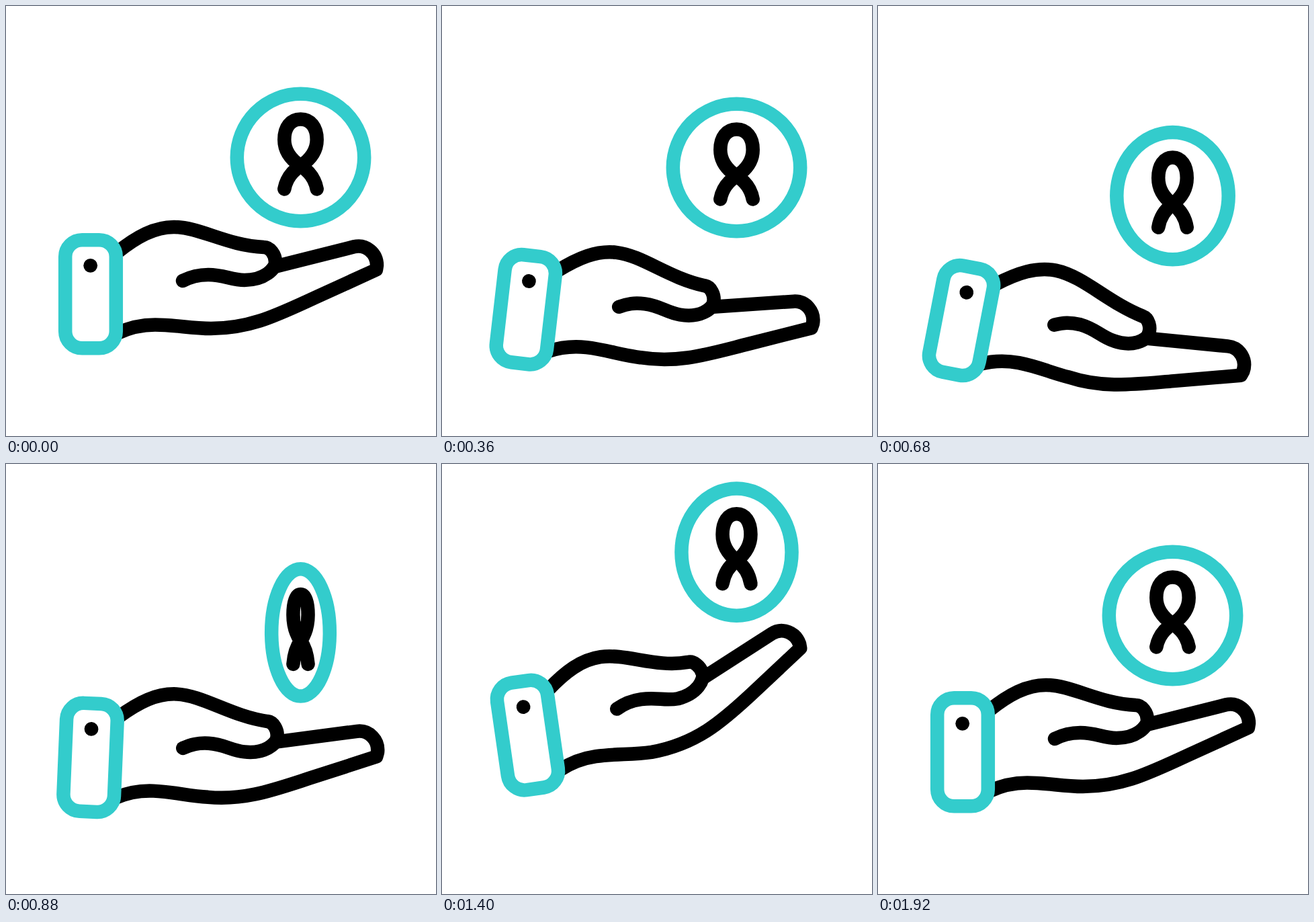
These frames come from a looping animation (640 by 640 pixels, 2160 ms). An HTML page:

```html
<!DOCTYPE html>
<html lang="en">
<head>
<meta charset="utf-8">
<title>Hand tossing a ribbon coin</title>
<style>
  html, body { margin: 0; width: 100%; height: 100%; overflow: hidden; background: #fff; }
  svg { display: block; width: 100vw; height: 100vh; }
  .line { fill: none; stroke: #000; stroke-width: 20.5; stroke-linejoin: round; }
  .round { stroke-linecap: round; }
  .teal { stroke: #33cccc; }
</style>
</head>
<body>
<svg viewBox="0 0 640 640">
  <path id="thumb" class="line"/>
  <path id="palm" class="line"/>
  <path id="crease" class="line round"/>
  <g id="cuff">
    <rect class="line teal" x="88.2" y="348.2" width="75.6" height="161.1" rx="25"/>
    <circle cx="125.7" cy="386.3" r="10.4"/>
  </g>
  <g id="coin">
    <path id="ribbon" class="line round"/>
    <ellipse id="ring" class="line teal" cx="438.5" cy="225.5" ry="94.7"/>
  </g>
</svg>
<script>
const LOOP = 2160, STEP = 40, LAST = 47;
const WRIST = { x: 126, y: 428.75 }, AXIS_Y = 404, COIN_X = 438.5;
const RAD = Math.PI / 180;

const shapes = {
  thumb: "M165 367 C195 343 221 329 250 329 C289 329 330 357 384 359 C393 359 401 370 401 381",
  crease: "M401 381 C401 391 385 408 355 408 C335 408 325 400 301 400 C285 400 275 403 263 409",
  palm: "M402 387.5 L518 358.3 C536 354 552 368 552 386 L551 392.5 L460 434 " +
        "C405 459 365 480 305 480 C275 480 252 474.5 222 474.5 C202 474.5 185 478 166 487",
  ribbon: "M414.3 272.5 C417 258 424 247 438.5 238 C452 229 462.7 217 462.7 199 " +
          "C462.7 180 453 168.5 438.5 168.5 C424 168.5 414.3 180 414.3 199 " +
          "C414.3 217 425 229 438.5 238 C453 247 460 258 462.7 272.5"
};

// Each track: [step, value], eased between neighbours.
const tracks = {
  wrist: [[0, 0], [14.6, 11.5], [28.4, -8.9], [32.1, -8.9], [43, 0]],
  fingers: [[0, 0], [15.6, 19.8], [29.7, -20.4], [31.8, -20.4], [44, 0]],
  lift: [[3.5, 0], [17, 58], [30.5, -96.2], [33, -96.2], [45.2, 0]],
  flip: [[12.1, 1], [38.1, -1]]
};

const el = id => document.getElementById(id);
const clamp01 = v => Math.min(1, Math.max(0, v));
const smooth = v => { const u = clamp01(v); return u * u * (3 - 2 * u); };

function valueAt(keys, n) {
  let v = keys[0][1];
  for (let i = 1; i < keys.length; i++) {
    const [a, from] = keys[i - 1], [b, to] = keys[i];
    if (n > a) v = from + (to - from) * smooth((n - a) / (b - a));
  }
  return v;
}

const mapPath = (d, fn) => d.replace(/([\d.]+) ([\d.]+)/g,
  (_, x, y) => fn(+x, +y).map(v => v.toFixed(2)).join(" "));

// Bends the forearm axis: wrist angle first, finger angle past the knuckles.
function bender(wrist, fingers, dx, dy) {
  const bend = fingers - wrist, hinge = 332 - 3 * bend;
  const angle = x => RAD * (wrist + bend * smooth((x - hinge + 55) / 110));
  const rise = AXIS_Y - WRIST.y;
  const startX = WRIST.x + dx - rise * Math.sin(wrist * RAD);
  const startY = WRIST.y + dy + rise * Math.cos(wrist * RAD);
  return (x, y) => {
    const parts = 40, h = (x - WRIST.x) / parts;
    let px = startX, py = startY;
    for (let i = 0; i < parts; i++) {
      const a = angle(WRIST.x + (i + 0.5) * h);
      px += h * Math.cos(a);
      py += h * Math.sin(a);
    }
    const a = angle(x), off = y - AXIS_Y;
    return [px - off * Math.sin(a), py + off * Math.cos(a)];
  };
}

function draw(n) {
  const wrist = valueAt(tracks.wrist, n), fingers = valueAt(tracks.fingers, n);
  const dx = -0.18 * wrist;
  const dy = 190 * Math.sin(wrist * RAD) + 0.028 * wrist * wrist;
  const bend = bender(wrist, fingers, dx, dy);
  for (const id of ["thumb", "crease", "palm"])
    el(id).setAttribute("d", mapPath(shapes[id], bend));
  el("cuff").setAttribute("transform",
    `translate(${dx} ${dy}) rotate(${wrist} ${WRIST.x} ${WRIST.y})`);

  const flip = valueAt(tracks.flip, n);
  el("coin").setAttribute("transform", `translate(0 ${valueAt(tracks.lift, n)})`);
  el("ring").setAttribute("rx", Math.max(0.01, 94.7 * Math.abs(flip)));
  el("ribbon").setAttribute("d",
    mapPath(shapes.ribbon, (x, y) => [COIN_X + (x - COIN_X) * flip, y]));
}

let shown = -1;
function tick() {
  const t = performance.now() % LOOP;
  const n = Math.min(LAST, Math.max(0, Math.floor(t / STEP) - 1));
  if (n !== shown) draw(shown = n);
  requestAnimationFrame(tick);
}
tick();
</script>
</body>
</html>
```
